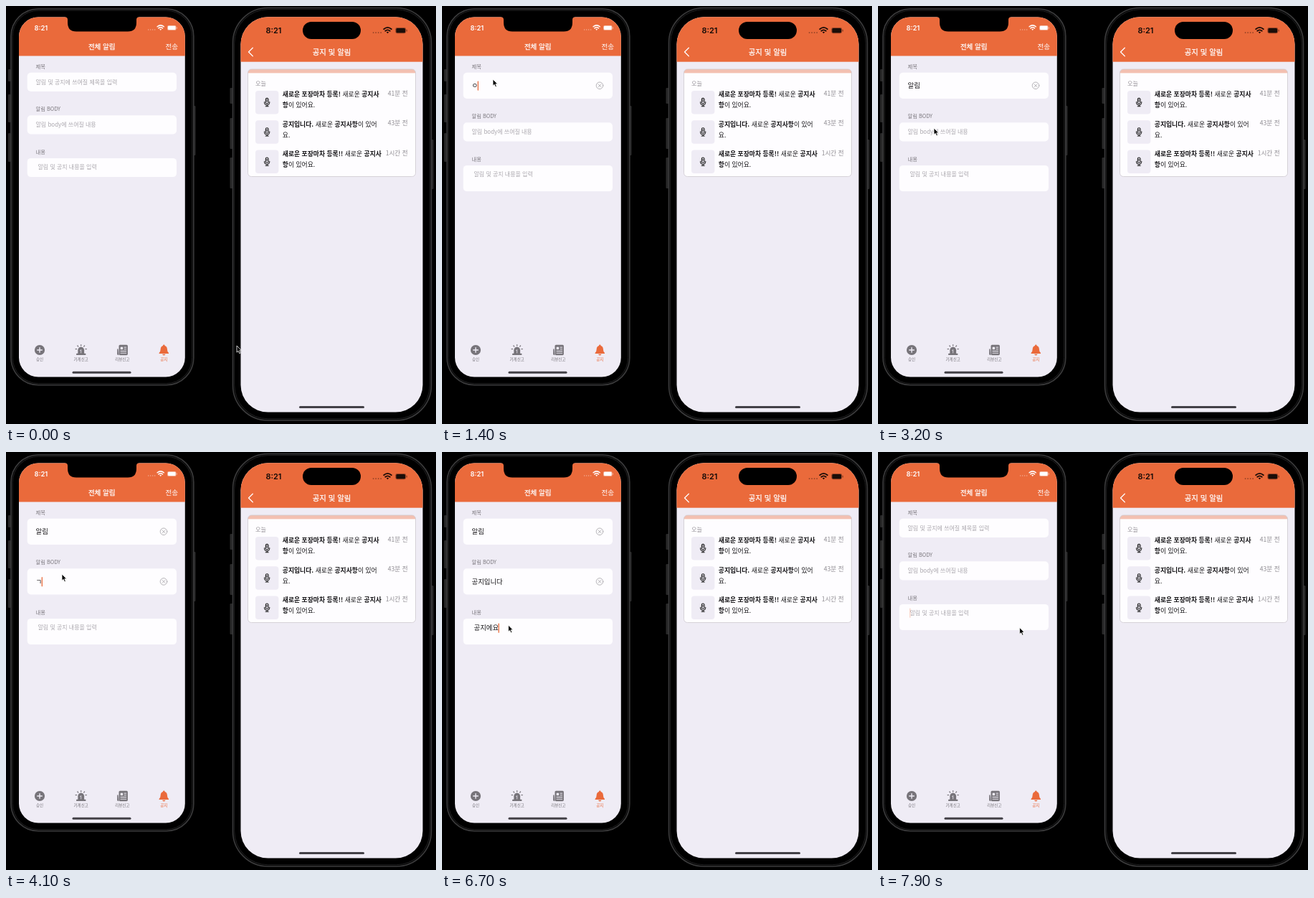
Animation, 600 px wide and 582 px high, one loop 8000 ms. Source, as an HTML page:

```html
<!DOCTYPE html>
<html lang="ko">
<head>
<meta charset="utf-8">
<title>알림 전송</title>
<style>
  html, body { margin: 0; width: 100%; height: 100%; overflow: hidden; background: #000; }
  svg { display: block; width: 600px; height: 582px; }
  text { font-family: "Noto Sans CJK KR", "Noto Sans CJK", "Noto Sans", sans-serif; white-space: pre; }
  .clock { font-family: Inter, sans-serif; font-weight: 600; }
  .title { stroke: #fefdff; stroke-width: .25px; }
</style>
</head>
<body>
<svg id="stage" viewBox="0 0 600 582" xmlns="http://www.w3.org/2000/svg"></svg>
<script>
const LOOP = 8000;
const ORANGE = "#ea6a3b", PAPER = "#efecf5", WHITE = "#fefdff", GRAY = "#77747a", HINT = "#aaa7ad", BAR = "#434147";
const stage = document.getElementById("stage");

// Text is placed by the visual centre of its glyphs.
const label = (x, cy, size, body, fill, opts = "") =>
  `<text x="${x}" y="${cy + size * 0.37}" font-size="${size}" fill="${fill}" ${opts}>${body}</text>`;
const rect = (x, y, w, h, r, fill, opts = "") =>
  `<rect x="${x}" y="${y}" width="${w}" height="${h}" rx="${r}" fill="${fill}" ${opts}/>`;
const path = (d, opts) => `<path d="${d}" ${opts}/>`;
const at = (x, y, body, scale = 1) => `<g transform="translate(${x} ${y}) scale(${scale})">${body}</g>`;
const line = (color, width) =>
  `fill="none" stroke="${color}" stroke-width="${width}" stroke-linecap="round" stroke-linejoin="round"`;
const MIDDLE = 'text-anchor="middle"', END = 'text-anchor="end"';

function shell(x, y, w, h, r, buttons) {
  return buttons.map(([bx, by, bh]) => rect(bx, by, 4, bh, 1.2, "#292929")).join("") +
    rect(x, y, w, h, r, "#060606", 'stroke="#3b3b3c" stroke-width="1.6"') +
    rect(x + 2.2, y + 2.2, w - 4.4, h - 4.4, r - 2, "#000", 'stroke="#202021" stroke-width="1"');
}

function statusIcons(color, scale) {
  const dots = [-17, -14, -11, -8].map(x => `<circle cx="${x}" cy="2.6" r=".75" opacity=".45"/>`).join("");
  const wifi = path("M-4.6-1.5Q0-5.4 4.6-1.5M-2.8.6Q0-1.7 2.8.6", line(color, 1.5)) +
    path("M-1.5 2L0 3.6 1.5 2Q0 .8-1.5 2Z", "");
  const battery = rect(9.3, -3.4, 12.6, 7, 2, color, 'opacity=".4"') +
    rect(10.2, -2.5, 10.8, 5.2, 1.3, color) + rect(22.4, -1, 0.9, 2.4, 0.4, color, 'opacity=".5"');
  return `<g fill="${color}" transform="scale(${scale})">${dots}${wifi}${battery}</g>`;
}

const plusIcon = `<circle r="7.1" fill="${GRAY}"/>` + path("M-3.3 0H3.3M0-3.3V3.3", line(PAPER, 1.4));
const sirenIcon = path("M-4.4 5V.2A4.4 4.4 0 0 1 4.4.2V5Z", `fill="${GRAY}"`) +
  rect(-6.6, 4.7, 13.2, 2.3, 0.6, GRAY) +
  path("M0-7.4V-5.9M-4.9-6L-3.9-4.9M4.9-6L3.9-4.9M-7.6-1.4H-6.2M7.6-1.4H6.2", line(GRAY, 1.2)) +
  path("M0 4V.2M-1.2.8L0-.4", line(PAPER, 0.8));
const newsIcon = rect(-4.8, -7.2, 12.4, 14.4, 1.6, GRAY) +
  path("M-5.8-1.5H-7.2V5.4Q-7.2 7.2-5 7.2Z", `fill="${GRAY}"`) +
  rect(-2.6, -4.2, 3.4, 3.4, 0.3, PAPER) +
  path("M2.6-3.8H5.4M2.6-1.2H5.4M-2.4 1.5H5.4M-2.4 4.2H5.4", line(PAPER, 1));
const bellIcon = path("M0-7.4Q1.2-7.4 1.3-6.1Q4.6-5 4.6-1.2Q4.6 2.4 6.7 4V5H-6.7V4Q-4.6 2.4-4.6-1.2Q-4.6-5-1.3-6.1Q-1.2-7.4 0-7.4ZM-2.2 5.8H2.2Q1.8 7.5 0 7.5Q-1.8 7.5-2.2 5.8Z", `fill="${ORANGE}"`);
const micIcon = rect(-2.1, -6.4, 4.2, 8.6, 2.1, "none", 'stroke="#151515" stroke-width="1.2"') +
  path("M-4.1-.5V.3A4.1 4.1 0 0 0 4.1.3V-.5M0 4.4V6.5M-2.3 6.5H2.3M-.6-3.6H.6M-.6-1.6H.6", line("#151515", 1.15));

function senderPhone() {
  const tabs = [[47, "승인", plusIcon], [104.7, "가게신고", sirenIcon], [162.3, "리뷰신고", newsIcon], [220.3, "공지", bellIcon]];
  return shell(7, 4, 254.8, 523.8, 38, [[3, 88, 17], [3, 123, 39], [3, 177, 40], [260.5, 139, 69]]) +
    `<clipPath id="senderScreen">${rect(18, 15.5, 231.8, 501, 27, "#fff")}</clipPath>
    <g clip-path="url(#senderScreen)">${rect(18, 15, 232, 502, 0, PAPER)}${rect(18, 15, 232, 54.5, 0, ORANGE)}</g>` +
    path("M82 15Q86 15.5 86 19V23Q86 35.5 98 35.5H170Q182 35.5 182 23V19Q182 15.5 186 15Z", 'fill="#000"') +
    label(39.5, 30.3, 9.4, "8:21", WHITE, 'class="clock"') +
    at(215.7, 30.3, statusIcons(WHITE, 1)) +
    label(133.7, 56.5, 9.5, "전체 알림", WHITE, `${MIDDLE} class="title"`) +
    label(240.2, 56.5, 9.6, "전송", WHITE, END) +
    '<g id="form"></g>' +
    tabs.map(([x, name, icon], i) => at(x, 479, icon) +
      label(x, 491.7, 5.5, name, i === 3 ? ORANGE : GRAY, MIDDLE)).join("") +
    rect(92.5, 508.8, 82, 3, 1.5, BAR);
}

function receiverPhone() {
  const b = s => `<tspan font-weight="700">${s}</tspan>`;
  const notices = [
    [b("새로운 포장마차 등록!") + " 새로운 " + b("공지사"), b("항") + "이 있어요.", "41분 전"],
    [b("공지입니다.") + " 새로운 " + b("공지사항") + "이 있어", "요.", "43분 전"],
    [b("새로운 포장마차 등록!!") + " 새로운 " + b("공지사"), b("항") + "이 있어요.", "1시간 전"],
  ];
  return shell(316.5, 2.5, 277, 574.5, 49, [[312.5, 114, 22], [312.5, 156, 43], [312.5, 211, 43], [592.5, 186, 69]]) +
    `<clipPath id="receiverScreen">${rect(327.5, 15.3, 254, 550.3, 38, "#fff")}</clipPath>
    <g clip-path="url(#receiverScreen)">${rect(327, 15, 255, 551, 0, PAPER)}${rect(327, 15, 255, 62.7, 0, ORANGE)}</g>` +
    rect(414, 22, 81, 24, 12, "#000") +
    label(362.4, 34, 11, "8:21", "#150b08", 'class="clock"') +
    at(532.5, 34, statusIcons("#1b0d08", 1.17)) +
    path("M344.3 58.3L338.5 64L344.3 69.7", line(WHITE, 1.3)) +
    label(454.5, 63.8, 10.4, "공지 및 알림", WHITE, `${MIDDLE} class="title"`) +
    `<clipPath id="card">${rect(337.5, 88, 234, 149.5, 5, "#fff")}</clipPath>
    <g clip-path="url(#card)">${rect(337, 88, 235, 150, 0, WHITE)}${rect(337, 88, 235, 5.4, 0, "#f3c0b1")}</g>` +
    rect(337.5, 88, 234, 149.5, 5, "none", 'stroke="#cfcad0" stroke-width=".8"') +
    label(348, 107.8, 8.2, "오늘", "#98959b") +
    notices.map(([first, second, age], i) => {
      const y = i * 41.3;
      return rect(348, 118 + y, 32.4, 32.4, 4, PAPER) + at(364.2, 134 + y, micIcon, 0.88) +
        label(385.8, 123 + y, 8.82, first, "#151417") + label(385.8, 138.2 + y, 8.82, second, "#151417") +
        label(560.6, 121.8 + y, 8.6, age, "#8f8c92", END);
    }).join("") +
    rect(409, 557, 91, 3, 1.5, BAR);
}

stage.innerHTML = senderPhone() + receiverPhone() +
  `<g id="caret">${rect(-0.1, -6.6, 1.3, 13.2, 0.6, ORANGE)}</g>
  <text id="ruler" font-size="9.4" visibility="hidden"></text>
  <g id="pointer">${path("M0 0V9.2L2.1 7.3L3.7 10.8L5.3 10.1L3.8 6.7H6.6Z", 'fill="#000" stroke="#fff" stroke-width=".8" stroke-linejoin="round"')}</g>`;

const [form, caret, ruler, pointer] = ["form", "caret", "ruler", "pointer"].map(id => document.getElementById(id));

const SENT = 7430;
const fields = [
  { name: "제목", hint: "알림 및 공지에 쓰여질 제목을 입력", x: 41.5, focus: [950, 3100], start: 1350, step: 180,
    keys: "ㅇ 아 알 알ㄹ 알리 알림".split(" ") },
  { name: "알림 BODY", hint: "알림 body에 쓰여질 내용", x: 41.5, focus: [3250, 5100], start: 4050, step: 80,
    keys: "ㄱ 고 공 공ㅈ 공지 공징 공지이 공지입 공지입ㄴ 공지입니 공지입닏 공지입니다".split(" ") },
  { name: "내용", hint: "알림 및 공지 내용을 입력", x: 44.5, focus: [5750, LOOP], start: 5850, step: 90, multiline: true,
    keys: "ㄱ 고 공 공ㅈ 공지 공징 공지에 공지엥 공지에요".split(" ") },
];

const route = [
  [0, 322, 473], [100, 322, 473], [900, 71, 102], [2450, 71, 102], [2950, 78, 170], [4800, 78, 170],
  [5180, 28, 223], [5400, 28, 223], [5750, 92.5, 241], [6750, 92.5, 241], [7200, 231, 53], [7420, 231, 53],
  [7850, 197.6, 244.4], [LOOP, 197.6, 244.4],
];

const keyIndex = (field, t) => Math.min(field.keys.length - 1, Math.floor((t - field.start) / field.step));

const typed = (field, t) => t < field.start || t >= SENT ? "" : field.keys[keyIndex(field, t)];

function lastActivity(field, t) {
  if (t >= SENT) return SENT;
  return t < field.start ? field.focus[0] : field.start + keyIndex(field, t) * field.step;
}

function blink(age) {
  const phase = age % 1000;
  if (phase < 400) return 1;
  if (phase < 500) return (500 - phase) / 100;
  return phase < 900 ? 0 : (phase - 900) / 100;
}

const clearIcon = y => `<g ${line("#a5a2a8", 0.8)}><circle cx="220" cy="${y}" r="4.8"/>` +
  `<path d="M218 ${y - 2}l4 4m0-4l-4 4"/></g>`;

let shown = "";
function drawForm(t) {
  let top = 92.7, html = "";
  caret.setAttribute("opacity", 0);
  for (const field of fields) {
    const text = typed(field, t);
    const tall = field.multiline ? t >= fields[0].start : text;
    const height = tall ? 36.2 : 26.2;
    const cy = field.multiline ? top + (text ? 13 : 12) : top + height / 2;
    html += label(41.5, top - 8.8, 7.3, field.name, "#7a777d") + rect(29.7, top, 208.3, height, 5, WHITE) +
      (text ? label(field.x, cy, 9.4, text, "#151417") : label(field.x, cy, 7.97, field.hint, HINT)) +
      (text && !field.multiline ? clearIcon(cy) : "");
    if (t >= field.focus[0] && t < field.focus[1]) {
      ruler.textContent = text;
      const width = text ? ruler.getComputedTextLength() : 0;
      caret.setAttribute("transform", `translate(${field.x + width - 0.4} ${cy + 0.3})`);
      caret.setAttribute("opacity", blink(t - lastActivity(field, t)));
    }
    top += height + 33.4;
  }
  if (html !== shown) form.innerHTML = shown = html;
}

function movePointer(t) {
  const i = route.findIndex((p, n) => n && t <= p[0]);
  const [t0, x0, y0] = route[i - 1], [t1, x1, y1] = route[i];
  const u = (t - t0) / (t1 - t0), k = u * u * (3 - 2 * u);
  pointer.setAttribute("transform", `translate(${x0 + (x1 - x0) * k} ${y0 + (y1 - y0) * k})`);
}

function render(t) {
  drawForm(t);
  movePointer(t);
}

const begin = performance.now();
function tick(now) {
  render(Math.max(0, now - begin) % LOOP);
  requestAnimationFrame(tick);
}
render(0);
requestAnimationFrame(tick);
</script>
</body>
</html>
```
